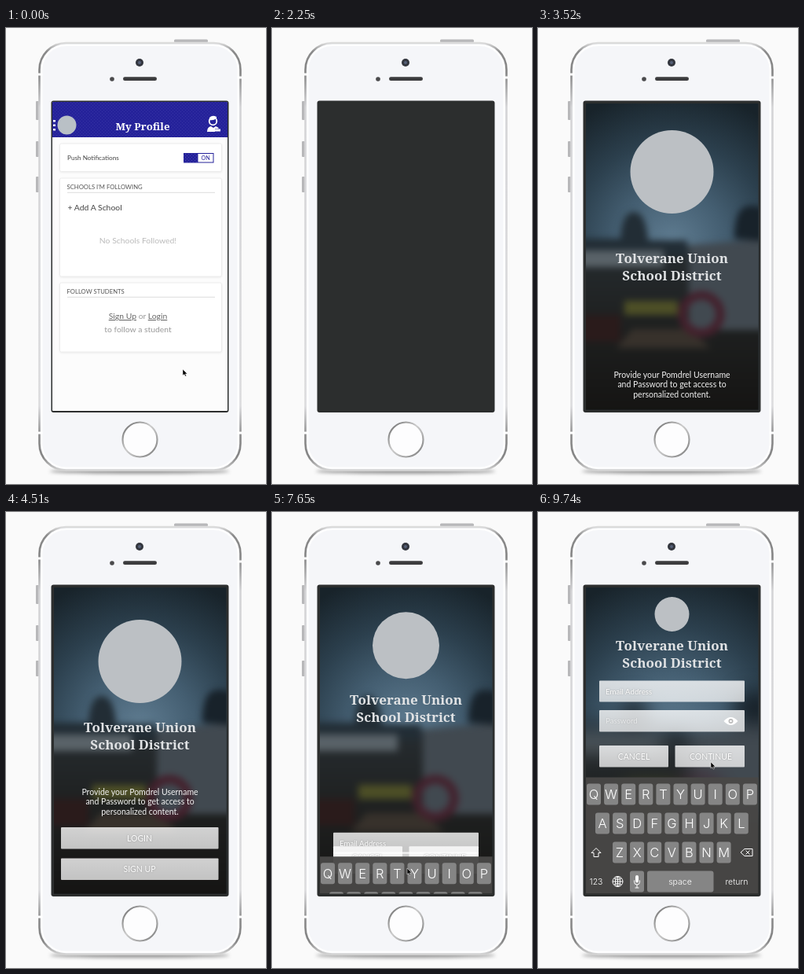
An HTML page for the animation above (9.82 s loop, 331 by 580 pixels).

```html
<!DOCTYPE html>
<html lang="en">
<head>
<meta charset="utf-8">
<title>School app sign-in</title>
<style>
  html, body { margin: 0; width: 100%; height: 100%; overflow: hidden; background: #fafafa; }
  svg { display: block; width: 100%; height: 100%; font-family: Lato, sans-serif; }
  .mid { text-anchor: middle; }
  .slab { font-family: "Noto Serif", serif; font-weight: 700; text-anchor: middle; }
  .label { font-size: 7.7px; fill: #555; }
  .body { font-size: 10.4px; }
  .card { fill: #fff; stroke: #ececec; filter: drop-shadow(0 1px 1px #0001); }
  .rule { stroke: #d4d4d4; stroke-width: .8; }
  .panel rect { fill: url(#glass); }
  .panel text { fill: #fff; font-size: 10.5px; text-shadow: 0 0 2px #777a; }
  .keys { font-family: Inter, sans-serif; font-weight: 300; fill: #fff; text-anchor: middle; }
  .keys rect { fill: #858585; }
  .line { fill: none; stroke: #fff; }
</style>
</head>
<body>
<svg viewBox="0 0 331 580">
  <defs>
    <linearGradient id="metal" x2="0" y2="1">
      <stop offset="0" stop-color="#ddd"/><stop offset=".02" stop-color="#8a8a8a"/>
      <stop offset=".07" stop-color="#858585"/><stop offset=".15" stop-color="#d4d4d6"/>
      <stop offset=".85" stop-color="#dcdcde"/><stop offset=".92" stop-color="#8a8a8a"/>
      <stop offset=".97" stop-color="#858585"/><stop offset="1" stop-color="#d4d4d4"/>
    </linearGradient>
    <linearGradient id="ring" x2="1" y2="1">
      <stop offset="0" stop-color="#666"/><stop offset=".45" stop-color="#ccc"/>
      <stop offset=".6" stop-color="#bbb"/><stop offset="1" stop-color="#777"/>
    </linearGradient>
    <radialGradient id="sky" gradientUnits="userSpaceOnUse" cx="170" cy="272" r="195">
      <stop offset="0" stop-color="#5f7c91"/><stop offset=".35" stop-color="#445e71"/>
      <stop offset=".65" stop-color="#2c404e"/><stop offset="1" stop-color="#18232a"/>
    </radialGradient>
    <linearGradient id="ground" x2="0" y2="1">
      <stop offset="0" stop-color="#262c30"/><stop offset=".35" stop-color="#1f2121"/>
      <stop offset="1" stop-color="#110f0d"/>
    </linearGradient>
    <linearGradient id="glass" x2="0" y2="1">
      <stop offset="0" stop-color="#fff" stop-opacity=".8"/>
      <stop offset="1" stop-color="#fff" stop-opacity=".74"/>
    </linearGradient>
    <pattern id="weave" width="4" height="4" patternUnits="userSpaceOnUse">
      <path d="M0 0h1v1h-1zM2 2h1v1h-1z" fill="#4643b0"/>
    </pattern>
    <clipPath id="screen"><rect x="59" y="94" width="223" height="393" rx="1"/></clipPath>
    <clipPath id="inset"><rect x="61" y="96" width="219.500" height="389.500"/></clipPath>
  </defs>

  <!-- phone -->
  <ellipse cx="170" cy="564" rx="115" ry="3" fill="#0006" style="filter:blur(2px)"/>
  <g fill="#b8b8ba">
    <rect x="214" y="14.5" width="43" height="4" rx="1.5"/>
    <rect x="38" y="93" width="4" height="24" rx="1"/>
    <rect x="38" y="144" width="4" height="20" rx="1"/>
    <rect x="38" y="189" width="4" height="20" rx="1"/>
  </g>
  <rect x="42.5" y="19" width="256" height="543.5" rx="34" fill="#f5f6f9" stroke="url(#metal)" stroke-width="2.6"/>
  <rect x="45.5" y="22" width="250" height="537.5" rx="31" fill="none" stroke="#fff" stroke-width="2"/>
  <path d="M41 59h4M296 63h4M41 515h4M296 515h4" stroke="#fff" stroke-width="3"/>
  <circle cx="170" cy="44" r="5" fill="#33363e"/><circle cx="170" cy="44" r="2" fill="#566078"/>
  <circle cx="135" cy="65" r="2.8" fill="#4a4a4c"/>
  <rect x="149" y="62.3" width="43" height="4.8" rx="2.4" fill="#3c3c3e"/>
  <circle cx="170.5" cy="523.5" r="22" fill="#fdfdfe" stroke="url(#ring)" stroke-width="2.2"/>
  <rect x="57.5" y="92.5" width="226" height="396.5" rx="3" fill="#2c2e2e"/>

  <g id="profile" clip-path="url(#screen)">
    <path d="M59 94h223v393H59z" fill="#fcfcfc"/>
    <path d="M59 94h223v45H59z" fill="#25229a"/>
    <path d="M59 94h223v45H59z" fill="url(#weave)" opacity=".5"/>
    <path d="M60 117h3v2.4h-3zM60 122.5h3v2.4h-3zM60 128h3v2.4h-3z" fill="#fff"/>
    <circle cx="77.5" cy="123.5" r="12" fill="#b9c0c6"/>
    <text class="slab" x="174" y="130" font-size="13.3" fill="#fff">My Profile</text>
    <circle class="line" cx="263.5" cy="118.5" r="4.8" stroke-width="1.8"/>
    <path d="M259 117q5 1 9-2v-2q-5-3-9 1z" fill="#fff"/>
    <path d="M256 132q0-6 5-7l3 2 3-2q3 1 4 3h-5v4z" fill="#fff"/>
    <path d="M265 130h8" stroke="#fff" stroke-width="3"/>

    <rect class="card" x="68.5" y="147" width="206" height="35.5" rx="2"/>
    <rect class="card" x="68.5" y="191" width="206" height="125" rx="2"/>
    <rect class="card" x="68.5" y="324" width="206" height="88" rx="2"/>
    <path class="rule" d="M78 209.3h188M78 342.3h188"/>
    <text x="78" y="168" font-size="8.2" fill="#444">Push Notifications</text>
    <rect x="226" y="159" width="38.5" height="12.5" fill="#25229a"/>
    <rect x="226" y="159" width="18" height="12.5" fill="url(#weave)"/>
    <rect x="244.5" y="160" width="19" height="10.5" fill="#fff"/>
    <text class="mid" x="254" y="167.8" font-size="7.2" fill="#25229a">ON</text>
    <text class="label" x="77.5" y="204.5">SCHOOLS I'M FOLLOWING</text>
    <text class="body" x="78.5" y="231.5" fill="#444">+ Add A School</text>
    <text class="body mid" x="168" y="273.5" fill="#bbb">No Schools Followed!</text>
    <text class="label" x="77.5" y="337.5">FOLLOW STUDENTS</text>
    <g class="body mid" fill="#999">
      <text x="168" y="370"><tspan fill="#666" text-decoration="underline">Sign Up</tspan> or <tspan fill="#666" text-decoration="underline">Login</tspan></text>
      <text x="168" y="387">to follow a student</text>
    </g>
  </g>

  <g id="welcome" clip-path="url(#inset)">
    <path d="M59 94h223v393H59z" fill="url(#sky)"/>
    <g id="scene">
      <path d="M20 278h300v260H20z" fill="url(#ground)"/>
      <path d="M20 268h85q2-34 17-34t18 36h50v20H20z" fill="#222d35"/>
      <path d="M20 283h140v21H20z" fill="#596268"/>
      <path d="M192 276l130-10v118H192z" fill="#414950"/>
      <path d="M250 268q0-42 20-42t50 20v28z" fill="#18222a"/>
      <path d="M110 347h68v18h-68z" fill="#4d4f26"/>
      <path d="M20 365h85v34H20z" fill="#2a1b1b"/>
      <path d="M100 407l20-24h70l30 24z" fill="#37312b"/>
      <circle cx="208" cy="364" r="24" fill="none" stroke="#43202c" stroke-width="11"/>
    </g>
    <circle id="badge" r="53" fill="#bcc0c4"/>
    <g id="title" class="slab" font-size="17" fill="#e0e2e4">
      <text x="170.5" y="6">Tolverane Union</text>
      <text x="170.5" y="28">School District</text>
    </g>
    <g id="intro">
      <g class="mid" font-size="10.5" fill="#f2f2f2">
        <text x="170.5" y="359.5">Provide your Pomdrel Username</text>
        <text x="170.5" y="372">and Password to get access to</text>
        <text x="170.5" y="384.5">personalized content.</text>
      </g>
      <g class="panel mid">
        <rect x="70" y="401" width="200.5" height="27.5" rx="1"/>
        <rect x="70" y="440.5" width="200.5" height="27.5" rx="1"/>
        <text x="170" y="418.5">LOGIN</text>
        <text x="170" y="458">SIGN UP</text>
      </g>
    </g>
    <g id="email" class="panel">
      <rect x="78" width="185" height="27" rx="1"/>
      <text x="86" y="17" style="font-size:9.7px">Email Address</text>
    </g>
    <g id="password" class="panel">
      <rect x="78" width="185" height="27.5" rx="1"/>
      <text x="86" y="17" style="font-size:9.7px" opacity=".55">Password</text>
      <path d="M236.5 14q9-10 18 0q-9 10-18 0z" fill="#fff"/>
      <circle cx="245.5" cy="14" r="3" fill="#bbb"/><circle cx="245.5" cy="14" r="1.3" fill="#fff"/>
    </g>
    <g id="actions" class="panel mid">
      <rect x="78" width="88" height="27.5" rx="1"/>
      <rect x="174.5" width="88.5" height="27.5" rx="1"/>
      <text x="122" y="17.5">CANCEL</text>
      <text x="220" y="17.5">CONTINUE</text>
    </g>
    <g id="keyboard" class="keys">
      <path d="M59 0h223v152H59z" fill="#484746" fill-opacity=".96"/>
      <rect x="117" y="119" width="18" height="27" rx="3"/>
      <rect x="139" y="119" width="84.5" height="27" rx="3"/>
      <g font-size="10.5">
        <text x="74" y="136">123</text><text x="181" y="136">space</text><text x="253" y="136">return</text>
      </g>
      <path class="line" d="M74 90l6 6h-3v5h-6v-5h-3zM263 91h10v9h-10l-5-4.5zM264.5 93l5 5M269.5 93l-5 5M95 132.5h13M101.5 126v13M97 129q4.5 2 9 0M97 136q4.5-2 9 0M122.5 131v2q0 3.5 3.5 3.5t3.5-3.5v-2M126 136.5v4M123.5 140.5h5"/>
      <circle class="line" cx="101.5" cy="132.5" r="6.5"/>
      <ellipse class="line" cx="101.5" cy="132.5" rx="3" ry="6.5"/>
      <rect x="124" y="124.5" width="4" height="9.5" rx="2" style="fill:#fff"/>
    </g>
  </g>
  <path id="cursor" d="M0 0v8l1.9-1.6 1.3 2.7 1.4-.7-1.3-2.5h2.5z" fill="#000" stroke="#fff" stroke-width=".5"/>
</svg>

<script>
const LOOP = 9820;
const $ = id => document.getElementById(id);
const mix = (a, b, p) => a + (b - a) * p;
const place = (id, x, y, scale = 1) =>
  $(id).setAttribute('transform', `translate(${x} ${y}) scale(${scale})`);
const fade = (id, alpha) => $(id).setAttribute('opacity', alpha);

// Letter keys: row text, centre of its first key, top
[['QWERTYUIOP', 71, 8], ['ASDFGHJKL', 82, 45], ['ZXCVBNM', 104, 82]].forEach(([row, x0, y]) =>
  [...row].forEach((letter, i) => {
    const x = x0 + i * 22.1;
    $('keyboard').insertAdjacentHTML('beforeend',
      `<rect x="${x - 9}" y="${y}" width="18" height="27" rx="3"/>
       <text x="${x}" y="${y + 19.5}" font-size="16.5">${letter}</text>`);
  }));

// Cursor moves: start, end, target
const moves = [[510, 1450, 177, 371], [5300, 6400, 172, 453], [8450, 9400, 220, 318]];

function draw(t) {
  const ease = (from, to) => {
    const p = Math.min(1, Math.max(0, (t - from) / (to - from)));
    return p * p * (3 - 2 * p);
  };
  const leave = ease(1900, 2200), enter = ease(3204, 3974), form = ease(7350, 8120);

  fade('profile', 1 - leave);
  fade('welcome', ease(2480, 3150));

  place('badge', 170.5, mix(mix(179, 190, enter), 130, form), mix(1, 22 / 53, form));
  place('title', 0, mix(mix(304, 274, enter), 170, form));
  place('intro', 0, mix(135, 0, enter));
  fade('intro', 1 - ease(7300, 7600));
  place('email', 0, mix(507, 214.5, form));
  place('password', 0, mix(525, 252, form));
  place('actions', 0, mix(491, 297, form));
  place('keyboard', 0, mix(490, 337.5, form));
  $('scene').style.filter = `blur(${mix(4, 12, form * form)}px)`;

  let x = 225, y = 434;
  for (const [from, to, toX, toY] of moves) {
    const p = ease(from, to);
    x = mix(x, toX, p);
    y = mix(y, toY, p);
  }
  place('cursor', x, y);
  fade('cursor', t < 5200 ? 1 - leave : 1);
}

function tick() {
  draw(performance.now() % LOOP);
  requestAnimationFrame(tick);
}
tick();
</script>
</body>
</html>
```
